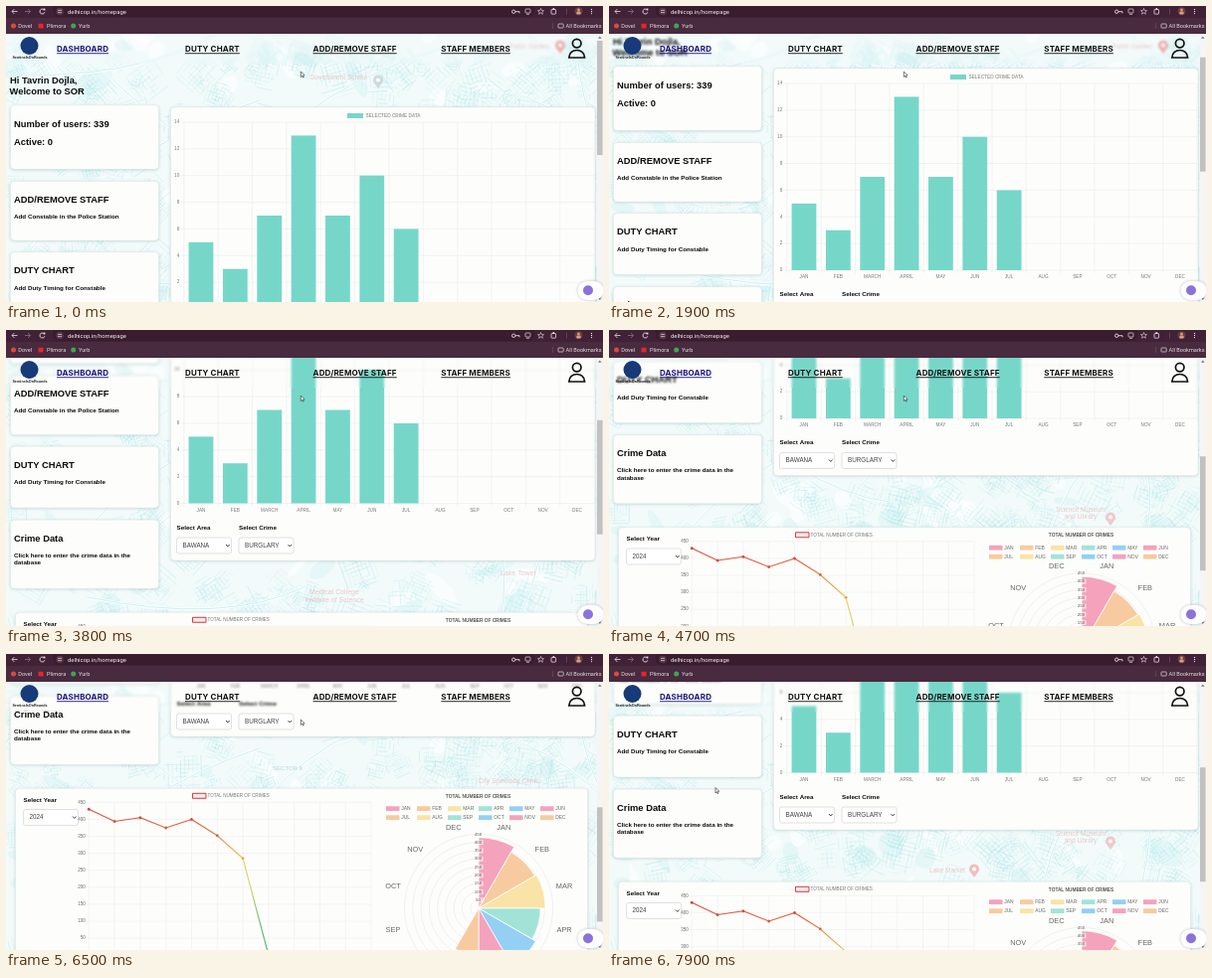
Animation, 600 px wide and 298 px high, one loop 8 s. Source, as an HTML page with a canvas:

```html
<!DOCTYPE html>
<html lang="en">
<head>
<meta charset="utf-8">
<title>Dashboard</title>
<style>
html, body { margin: 0; width: 100%; height: 100%; overflow: hidden; background: #fff; }
canvas { display: block; width: 600px; height: 298px; }
</style>
</head>
<body>
<canvas id="stage"></canvas>
<script>
const W = 600, H = 298, LOOP = 8000, TOP = 28, HEAD = 58;
const SANS = '"Liberation Sans", Arial, sans-serif';
const UI = 'Roboto, sans-serif';
const NAV = 'Inter, sans-serif';
const MONTHS = 'JAN FEB MARCH APRIL MAY JUN JUL AUG SEP OCT NOV DEC'.split(' ');
const SHORT = MONTHS.map(m => m.slice(0, 3));
const BARS = [5, 3, 7, 13, 7, 10, 6];
const CRIMES = [430, 394, 405, 375, 400, 352, 285, 0, 0, 0, 0, 0];
const TINTS = ['#f5a2bd', '#f7cb9f', '#f9e3a6', '#a2e3d8', '#93d0f3'];
const tint = i => TINTS[i % 5];

const SCROLL = [[0, 0], [900, 0], [1100, 12], [1400, 33], [1700, 33], [1900, 39], [2600, 92],
  [3200, 126], [3400, 130.5], [3800, 130.5], [4100, 150], [4700, 216], [5300, 292.5],
  [5500, 302], [6200, 302], [6500, 279.5], [7200, 198], [7500, 186.5], [7900, 185.5]];

const k = window.devicePixelRatio || 1;
const cv = document.getElementById('stage');
cv.width = W * k;
cv.height = H * k;
let g = cv.getContext('2d');

function along(keys, t) {
  for (let i = 1; i < keys.length; i++) {
    const [a, u] = keys[i - 1], [b, v] = keys[i];
    if (t <= b) return u + (v - u) * (t - a) / (b - a);
  }
  return keys[keys.length - 1][1];
}

function smooth(a, b, t) {
  const p = Math.min(1, Math.max(0, (t - a) / (b - a)));
  return p * p * (3 - 2 * p);
}

function seeded(s) {
  return () => {
    s = (s * 1664525 + 1013904223) % 4294967296;
    return s / 4294967296;
  };
}

function text(str, x, y, size, color = '#111', o = {}) {
  g.font = `${o.weight || 400} ${size}px ${o.font || SANS}`;
  g.textAlign = o.align || 'left';
  g.textBaseline = 'middle';
  g.letterSpacing = (o.space || 0) + 'px';
  g.fillStyle = color;
  g.fillText(str, x, y);
  return g.measureText(str).width;
}
const bold = (str, x, y, size = 6.25) => text(str, x, y, size, '#0c0c0c', { weight: 700 });

function rect(x, y, w, h, color) {
  g.fillStyle = color;
  g.fillRect(x, y, w, h);
}

function round(x, y, w, h, r, fill, stroke, lw = 0.6) {
  g.beginPath();
  g.roundRect(x, y, w, h, r);
  if (fill) { g.fillStyle = fill; g.fill(); }
  if (stroke) { g.strokeStyle = stroke; g.lineWidth = lw; g.stroke(); }
}

function disc(x, y, r, color) {
  g.beginPath();
  g.arc(x, y, r, 0, 7);
  g.fillStyle = color;
  g.fill();
}

function line(color, lw, ...p) {
  g.beginPath();
  for (let i = 0; i < p.length; i += 2) g.lineTo(p[i], p[i + 1]);
  g.strokeStyle = color;
  g.lineWidth = lw;
  g.stroke();
}

function pin(x, y, color) {
  g.beginPath();
  g.arc(x, y - 1.5, 5, Math.PI * 0.85, Math.PI * 0.15);
  g.lineTo(x, y + 7);
  g.closePath();
  g.fillStyle = color;
  g.fill();
  disc(x, y - 1.5, 2, '#fff');
}

// One district: a small, broken grid of streets.
function district(rnd) {
  const n = 4 + Math.floor(rnd() * 6), gap = 2.6 + rnd() * 2, len = n * gap;
  g.save();
  g.translate(rnd() * W, TOP + rnd() * (H - TOP));
  g.rotate(rnd() * 1.6);
  for (let i = 0; i <= n; i++) {
    const a = `rgba(160,226,230,${0.2 + rnd() * 0.35})`, lw = 0.4 + rnd() * 0.4, p = i * gap;
    line(a, lw, rnd() * len * 0.5, p, len * (0.5 + rnd() * 0.5), p);
    line(a, lw, p, rnd() * len * 0.5, p, len * (0.5 + rnd() * 0.5));
  }
  g.restore();
}

// City map behind the cards: it stays still while the page scrolls.
function makeMap() {
  const c = document.createElement('canvas');
  c.width = W * k;
  c.height = H * k;
  const main = g, rnd = seeded(41);
  g = c.getContext('2d');
  g.scale(k, k);
  rect(0, 0, W, H, '#f2fafa');
  for (let i = 0; i < 70; i++) {
    g.beginPath();
    g.ellipse(rnd() * W, rnd() * H, 6 + rnd() * 18, 3 + rnd() * 9, rnd() * 3, 0, 7);
    g.fillStyle = rnd() < 0.4 ? 'rgba(200,238,240,.3)' : 'rgba(255,255,255,.6)';
    g.fill();
  }
  for (let i = 0; i < 260; i++) district(rnd);
  for (let i = 0; i < 16; i++) {
    const x = rnd() * W, y = rnd() * H, a = rnd() * 6.3;
    g.beginPath();
    g.moveTo(x, y);
    g.quadraticCurveTo(x + 90 * Math.cos(a), y + 90 * Math.sin(a),
      x + 220 * Math.cos(a + 0.4), y + 220 * Math.sin(a + 0.4));
    g.strokeStyle = 'rgba(255,255,255,.9)';
    g.lineWidth = 2.4;
    g.stroke();
    g.strokeStyle = 'rgba(165,228,232,.6)';
    g.lineWidth = 0.9;
    g.stroke();
  }
  const pink = 'rgba(236,180,180,.7)', mid = { align: 'center' };
  text('Government School', 334, 72, 6.5, pink, mid);
  text('Public Garden', 526, 41, 6.5, pink, mid);
  text('SECTOR 9', 283, 115, 6, 'rgba(160,195,200,.7)', mid);
  text('City Specialty Clinic', 505, 128, 7, pink, mid);
  text('Science Museum', 474, 181, 6.5, pink, mid);
  text('and Library', 474, 188, 6.5, pink, mid);
  text('Lake Market', 340, 218, 6.5, pink, mid);
  text('Lake Tower', 515, 245, 7, pink, mid);
  text('Medical College', 330, 264, 7, pink, mid);
  text('Institute of Science', 330, 272, 7, pink, mid);
  pin(374, 76, 'rgba(195,205,205,.7)');
  pin(557, 41, 'rgba(238,150,150,.75)');
  pin(504, 190, 'rgba(242,180,180,.7)');
  pin(367, 218, 'rgba(240,165,165,.7)');
  g = main;
  return c;
}

function card(x, y, w, h) {
  g.save();
  g.shadowColor = 'rgba(60,110,110,.3)';
  g.shadowBlur = 3 * k;
  g.shadowOffsetY = 0.6 * k;
  round(x, y, w, h, 4, '#fdfefc');
  g.restore();
  round(x, y, w, h, 4, null, '#dde8e6', 0.5);
}

function select(label, x, y, w) {
  round(x, y, w, 16, 2, '#fff', '#c9cdd0');
  text(label, x + 6, y + 8.2, 6.3, '#444');
  line('#333', 0.9, x + w - 5.5, y + 7, x + w - 3.7, y + 9, x + w - 1.9, y + 7);
}

function barChart() {
  card(165.5, 102, 426.5, 260.5);
  rect(343, 108, 16, 5, '#76d7c9');
  text('SELECTED CRIME DATA', 361.5, 110.7, 4.75, '#777');
  const x0 = 178.8, step = 34.36, y = v => 305 - v * 13.43;
  for (let v = 0; v <= 14; v += 2) {
    line('#e4e6e6', 0.5, x0 - 3, y(v), 591, y(v));
    text(v, x0 - 4.5, y(v), 4.7, '#777', { align: 'right' });
  }
  for (let i = 0; i <= 12; i++) line('#e6e8e8', 0.5, x0 + i * step, y(14), x0 + i * step, 308);
  BARS.forEach((v, i) => rect(x0 + (i + 0.5) * step - 12.4, y(v), 24.8, 305 - y(v), '#76d7c9'));
  MONTHS.forEach((m, i) => text(m, x0 + (i + 0.5) * step, 312, 4.7, '#777', { align: 'center' }));
  bold('Select Area', 171.5, 329.7);
  bold('Select Crime', 234, 329.7);
  select('BAWANA', 171.5, 339.5, 55);
  select('BURGLARY', 234, 339.5, 55);
}

function lineChart() {
  bold('Select Year', 17.5, 426.7);
  select('2024', 17.5, 436, 55);
  round(187.5, 419.8, 13.5, 5, 0, '#e4ecee', '#e8343c', 1);
  text('TOTAL NUMBER OF CRIMES', 202.5, 422.6, 4.6, '#777');
  const x = i => 83.3 + i * 25.8, y = v => 582.8 - v * 154 / 450;
  for (let v = 0; v <= 450; v += 50) {
    line('#e8eaea', 0.5, 80.5, y(v), x(11), y(v));
    text(v, 79.8, y(v), 4.5, '#666', { align: 'right' });
  }
  SHORT.forEach((m, i) => {
    line('#e8eaea', 0.5, x(i), y(450), x(i), 585.5);
    text(i === 2 || i === 3 ? MONTHS[i] : m, x(i), 589, 4.5, '#666', { align: 'center' });
  });
  const fade = g.createLinearGradient(0, y(450), 0, y(0));
  fade.addColorStop(0, '#e2403c');
  fade.addColorStop(0.14, '#e85a3c');
  fade.addColorStop(0.24, '#ef8440');
  fade.addColorStop(0.38, '#f5cb52');
  fade.addColorStop(0.55, '#d3d25a');
  fade.addColorStop(0.78, '#62bd68');
  fade.addColorStop(1, '#45ae5c');
  g.lineJoin = 'round';
  line(fade, 1.1, ...CRIMES.flatMap((v, i) => [x(i), y(v)]));
  CRIMES.forEach((v, i) => {
    disc(x(i), y(v), 1.5, fade);
    disc(x(i), y(v), 0.8, 'rgba(70,100,90,.55)');
  });
}

function polarChart() {
  const cx = 475, cy = 535.5, unit = 74.6 / 450, slice = Math.PI / 6, mid = { align: 'center' };
  text('TOTAL NUMBER OF CRIMES', 474.5, 422.7, 4.75, '#555', { align: 'center', weight: 700 });
  SHORT.forEach((m, i) => {
    const x = 382 + (i % 6) * 31, y = i < 6 ? 435.2 : 444.2;
    rect(x, y - 2.4, 13.5, 4.8, tint(i));
    text(m, x + 15.3, y + 0.1, 4.9, '#666');
  });
  for (let v = 50; v <= 450; v += 50) {
    g.beginPath();
    g.arc(cx, cy, v * unit, 0, 7);
    g.strokeStyle = '#e0e3e3';
    g.lineWidth = 0.5;
    g.stroke();
  }
  CRIMES.forEach((v, i) => {
    const a = i * slice - Math.PI / 2;
    if (v) {
      g.beginPath();
      g.moveTo(cx, cy);
      g.arc(cx, cy, v * unit, a, a + slice);
      g.closePath();
      g.fillStyle = tint(i);
      g.fill();
      g.strokeStyle = '#fff';
      g.lineWidth = 0.8;
      g.stroke();
    }
    const b = a + slice / 2, dy = Math.sin(b);
    text(SHORT[i], cx + Math.cos(b) * 86 + Math.sign(Math.cos(b)) * 3, cy + dy * 84, 7.4, '#666', mid);
  });
  for (let v = 50; v <= 450; v += 50) {
    const y = cy - v * unit;
    rect(cx - 4.6, y - 2.5, 9.2, 5, 'rgba(255,255,255,.6)');
    text(v, cx - 0.5, y, 4.4, '#555', mid);
  }
}

function page() {
  bold('Hi Tavrin Dojla,', 4, 75.7, 9.375);
  bold('Welcome to SOR', 3.6, 86.7, 9.375);
  card(4.5, 99.8, 149, 64.5);
  bold('Number of users: 339', 8, 119, 9.375);
  bold('Active: 0', 8, 137.3, 9.375);
  card(4.5, 176.5, 149, 59.5);
  bold('ADD/REMOVE STAFF', 8, 195.3, 9.375);
  bold('Add Constable in the Police Station', 8, 211.8);
  card(4.5, 247.7, 149, 61.8);
  bold('DUTY CHART', 8, 266.7, 9.375);
  bold('Add Duty Timing for Constable', 8, 284);
  card(4.5, 321.7, 149, 69);
  bold('Crime Data', 8, 340.7, 9.375);
  bold('Click here to enter the crime data in the', 8, 357.6);
  bold('database', 8, 365.2);
  barChart();
  card(9.5, 414.8, 575, 206);
  lineChart();
  polarChart();
}

function header() {
  g.save();
  g.beginPath();
  g.rect(0, TOP, W, HEAD - TOP);
  g.clip();
  g.filter = `blur(${0.9 * k}px)`;
  g.drawImage(cv, 0, 16 * k, W * k, 56 * k, 0, 16, W, 56);
  g.restore();

  disc(23.5, 40, 9, '#173a78');
  text('SentinelsOnRounds', 24, 51.8, 3.7, '#222', { align: 'center', weight: 700 });
  [['DASHBOARD', 51], ['DUTY CHART', 180], ['ADD/REMOVE STAFF', 308.5], ['STAFF MEMBERS', 437.3]]
    .forEach(([label, x], i) => {
      const color = i ? '#111' : '#1c1478';
      const w = text(label, x, 43.7, 8, color, { font: NAV, weight: 700, space: 0.16 });
      rect(x, 47.3, w, 0.9, color);
    });
  g.strokeStyle = '#111';
  g.lineWidth = 1.7;
  g.beginPath();
  g.arc(573.7, 37.6, 4.3, 0, 7);
  g.stroke();
  g.beginPath();
  g.moveTo(565.8, 52);
  g.bezierCurveTo(565.8, 42, 581.6, 42, 581.6, 52);
  g.closePath();
  g.stroke();
}

function scrollbar(s) {
  rect(593.7, TOP, 6.3, H - TOP, '#f5f5f5');
  rect(594, 35 + s * 0.427, 5.6, 115, '#c1c1c1');
  const tri = (y, d) => {
    g.beginPath();
    g.moveTo(595, y);
    g.lineTo(598.6, y);
    g.lineTo(596.8, y + d);
    g.fillStyle = '#777';
    g.fill();
  };
  tri(32.8, -2.4);
  tri(293.6, 2.4);
}

function chrome() {
  const ink = '#e9dde2';
  rect(0, 0, W, TOP, '#482b3e');
  rect(0, 0, W, 12, '#412137');
  round(47, -3, 484, 14, 6, '#3a1c2f');
  line(ink, 0.8, 11.5, 5.5, 6, 5.5);
  line(ink, 0.8, 8.4, 3, 6, 5.5, 8.4, 8);
  line('#8a6f7b', 0.8, 19, 5.5, 24.5, 5.5);
  line('#8a6f7b', 0.8, 22.1, 3, 24.5, 5.5, 22.1, 8);
  g.beginPath();
  g.arc(36.5, 5.5, 2.5, 0.3, 5.5);
  g.strokeStyle = ink;
  g.lineWidth = 0.9;
  g.stroke();
  rect(37.6, 2.6, 1.8, 1.8, ink);
  disc(54, 5.5, 3.8, '#543648');
  line(ink, 0.7, 52, 4.4, 56, 4.4);
  line(ink, 0.7, 52, 6.6, 56, 6.6);
  text('delhicop.in/homepage', 62, 5.8, 5.9, '#f3ebee', { font: UI });

  round(508.5, 4, 3.4, 3.4, 1.7, null, ink, 0.9);
  line(ink, 0.9, 512, 5.7, 516, 5.7, 516, 7.3);
  round(522, 3, 5, 4, 0.6, null, ink, 0.7);
  line(ink, 0.7, 523, 8.3, 526, 8.3);
  g.beginPath();
  for (let i = 0; i < 10; i++) {
    const r = i % 2 ? 1.4 : 3.2, a = i * Math.PI / 5 - Math.PI / 2;
    g.lineTo(537.5 + r * Math.cos(a), 5.6 + r * Math.sin(a));
  }
  g.closePath();
  g.strokeStyle = ink;
  g.lineWidth = 0.6;
  g.stroke();
  round(548, 3.5, 4.6, 4.6, 0.6, null, ink, 0.8);
  disc(550.3, 3, 1, ink);
  rect(563, 2.5, 0.6, 6, '#7a5162');
  disc(575.5, 5.2, 4, '#6d3a35');
  disc(575.5, 4, 1.4, '#d0a08a');
  round(573.3, 5.6, 4.4, 3, 1.4, '#d0a08a');
  for (let i = -1; i < 2; i++) disc(588.5, 5.5 + i * 2.1, 0.65, ink);

  const label = (s, x) => text(s, x, 20.2, 5.6, ink, { font: UI });
  disc(7.5, 20, 2.5, '#e2463c');
  label('Dovel', 12.3);
  rect(32.5, 17.8, 5, 4.6, '#f0202c');
  label('Plimora', 41);
  disc(67.7, 20, 2.5, '#3fa558');
  label('Yurb', 73);
  rect(549.5, 17, 0.6, 6, '#7a5162');
  round(555, 18, 5.2, 4, 0.6, null, ink, 0.7);
  label('All Bookmarks', 562.5);
}

function cursor(x, y) {
  g.beginPath();
  [[0, 0], [0, 5.4], [1.3, 4.3], [2.1, 6.1], [3, 5.7], [2.2, 3.9], [3.8, 3.8]]
    .forEach(([dx, dy]) => g.lineTo(x + dx, y + dy));
  g.closePath();
  g.fillStyle = '#fff';
  g.fill();
  g.strokeStyle = '#222';
  g.lineWidth = 0.6;
  g.stroke();
}

function badge() {
  g.save();
  g.shadowColor = 'rgba(0,0,0,.25)';
  g.shadowBlur = 3 * k;
  round(574.5, 277, 26, 19, 9.5, '#fdfdff');
  g.restore();
  disc(585, 286.3, 5, '#8a72dc');
}

const map = makeMap();

function draw(t) {
  const s = along(SCROLL, t);
  g.setTransform(k, 0, 0, k, 0, 0);
  g.drawImage(map, 0, 0, W, H);
  g.save();
  g.translate(0, -s);
  page();
  g.restore();
  header();
  scrollbar(s);
  badge();
  chrome();
  const m = smooth(7200, 7900, t);
  cursor(296.3 - 189.3 * m, 66 + 68.5 * m);
}

const start = performance.now();
function tick() {
  const t = Math.max(0, performance.now() - start) % LOOP;
  draw(Math.floor(t / 100) * 100);
  requestAnimationFrame(tick);
}
tick();
</script>
</body>
</html>
```
